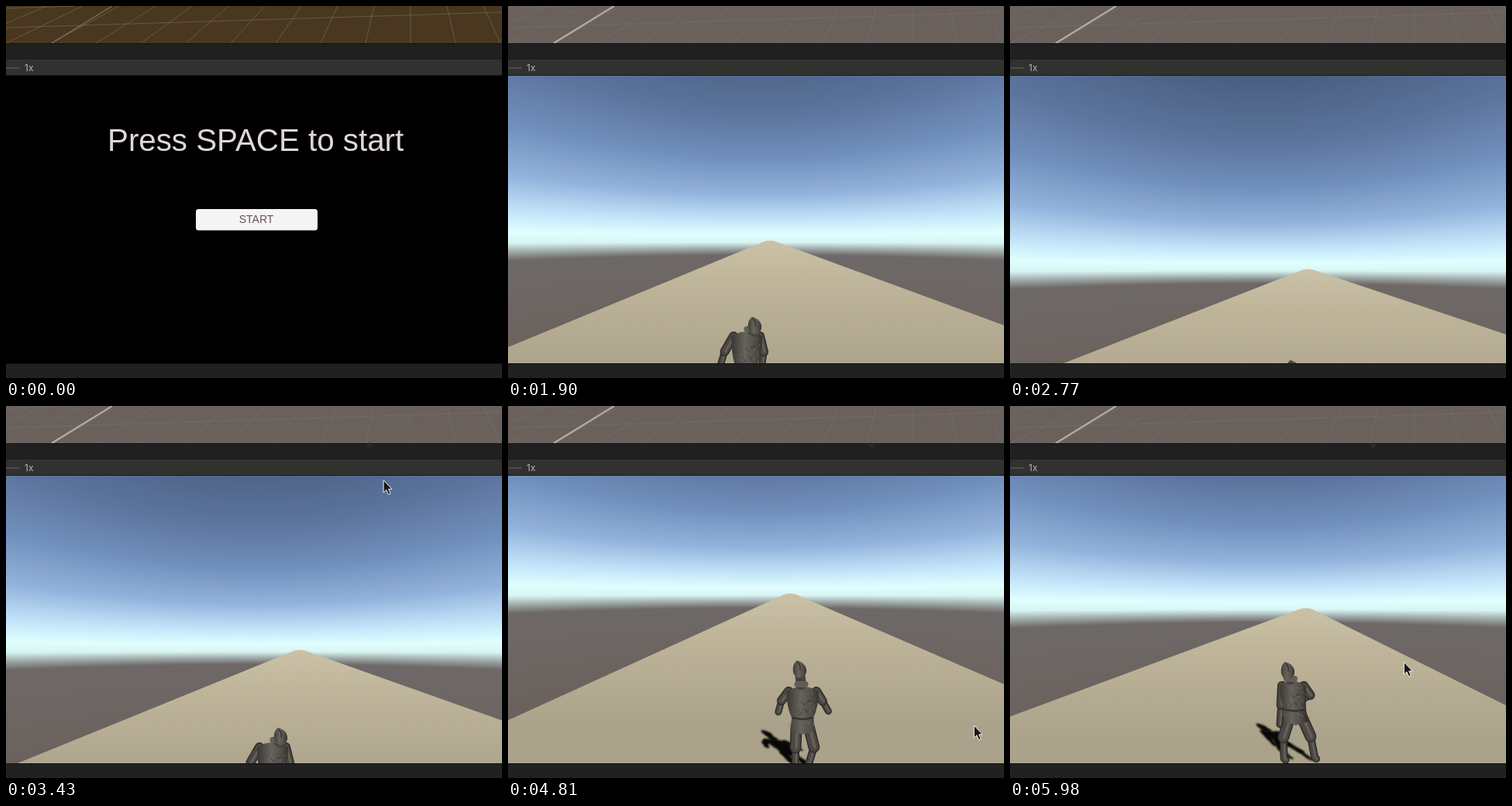
Write an HTML page with a canvas that moves like this. It is 640 by 480 pixels and loops after 6.01 s.

```html
<!DOCTYPE html>
<html lang="en">
<head>
<meta charset="utf-8">
<title>Runner</title>
<style>
html, body { margin: 0; width: 100%; height: 100%; overflow: hidden; background: #000; }
#stage { position: relative; width: 640px; height: 480px; overflow: hidden; }
canvas, svg { position: absolute; left: 0; top: 0; display: block; }
.ground { fill: #6a615c; }
.grid { fill: none; stroke: #7b7977; stroke-width: .8; opacity: .5; }
.axis { stroke: #b3aca0; stroke-width: 2.2; }
.menu .ground { fill: #4a371f; }
.menu .grid { stroke: #7b7060; opacity: .75; }
.menu .axis { stroke: #8d8578; stroke-width: 1; }
#title, .pointer { visibility: hidden; }
.menu #title, .steering .pointer { visibility: visible; }
.arial { font-family: "Liberation Sans", Arial, sans-serif; }
</style>
</head>
<body>
<div id="stage" class="menu">
<canvas id="game" width="640" height="480"></canvas>
<svg width="640" height="480">
  <rect class="ground" width="640" height="48"/>
  <path id="grid" class="grid"/>
  <path class="axis" d="M59 48L137 0"/>
  <rect y="48" width="640" height="21" fill="#202020"/>
  <rect y="48" width="640" height="1" fill="#111"/>
  <rect y="69" width="640" height="20" fill="#31312f"/>
  <path d="M0 68.5H640M0 89.5H640" stroke="#1a1a19"/>
  <path d="M0 80H18" stroke="#686866"/>
  <text x="24" y="84" font-size="12" fill="#b4b4b2" font-family="Inter, sans-serif">1x</text>
  <rect y="461" width="640" height="19" fill="#212121"/>
  <rect y="461" width="640" height="1" fill="#111"/>
  <path d="M0 479.5H640" stroke="#2b1c28"/>
  <path class="pointer" d="M464 51L469 47L474 51L469 55Z" fill="#2a2928"/>
  <g id="title" class="arial">
    <rect y="90" width="640" height="371" fill="#000"/>
    <text x="131" y="187" font-size="40.3" fill="#e1d6d6">Press SPACE to start</text>
    <rect x="245" y="262" width="157" height="27.5" rx="3.5" fill="#f5f5f5"/>
    <text x="323" y="280" font-size="14" fill="#62534f" text-anchor="middle">START</text>
  </g>
  <path id="cursor" class="pointer" d="M0 0V16L3.6 12.5L6.2 18.5L9 17.3L6.4 11.6H11Z" fill="#161616" stroke="#f4f4f4"/>
</svg>
</div>
<script>
const LOOP = 6010, START = 1290, STEP = 46.4, FOCAL = 321;
const stage = document.getElementById("stage");
const cursor = document.getElementById("cursor");
const ctx = document.getElementById("game").getContext("2d");

const mix = (a, b, k) => a + (b - a) * k;
const smooth = v => {
  const k = Math.max(0, Math.min(1, v));
  return k * k * (3 - 2 * k);
};

// Camera and runner; everything else follows from these
const keys = [
  { t: 1290, horizon: 279, apex: 328, drift: 0, x: 312, y: 374 },
  { t: 1900, horizon: 303, apex: 338, drift: .15, x: 318, y: 401 },
  { t: 2770, horizon: 340, apex: 385, drift: .21, x: 365, y: 457 },
  { t: 3430, horizon: 315, apex: 379, drift: .18, x: 354, y: 415 },
  { t: 4810, horizon: 242, apex: 364, drift: .06, x: 376, y: 328 },
  { t: 5980, horizon: 261, apex: 382, drift: -.34, x: 358, y: 330 }
];

function sceneAt(t) {
  const next = Math.max(1, keys.findIndex(key => key.t > t));
  const a = keys[next - 1], b = keys[next], k = smooth((t - a.t) / (b.t - a.t));
  return Object.fromEntries(Object.keys(a).map(name => [name, mix(a[name], b[name], k)]));
}

function fillGradient(g, stops) {
  for (const [at, color] of stops) g.addColorStop(at, color);
  return g;
}

// One column of sky and ground, horizon in the middle
const sky = document.createElement("canvas");
sky.width = 1;
sky.height = 800;
{
  const c = sky.getContext("2d");
  c.fillStyle = fillGradient(c.createLinearGradient(0, 0, 0, 800), [
    [-250, "#4a5e80"], [-160, "#5d769f"], [-105, "#7190bd"], [-60, "#93b3dc"], [-28, "#c2e3f9"],
    [-8, "#e0ffff"], [2, "#d6f5f3"], [10, "#a0aba9"], [18, "#6e6968"], [160, "#6a5e57"]
  ].map(([d, color]) => [(d + 400) / 800, color]));
  c.fillRect(0, 0, 1, 800);
}

function drawSky(h) {
  for (let x = 0; x < 640; x += 2) {
    const s = Math.hypot(1, (x - 325) / FOCAL);
    ctx.drawImage(sky, x, h - 400 * s, 2, 800 * s);
  }
}

// Looking further up lowers the camera and widens the road
function drawRoad({ horizon: h, apex, drift }) {
  const half = (4.5 + .0105 * (h - 242)) / 2, depth = 300, tip = 7;
  ctx.fillStyle = fillGradient(ctx.createLinearGradient(0, h, 0, h + 170),
    [[0, "#cbc1a7"], [.3, "#bfb59a"], [1, "#aba28b"]]);
  ctx.beginPath();
  ctx.moveTo(apex - tip - depth * (half - drift), h + depth);
  ctx.lineTo(apex - tip, h + .7);
  ctx.quadraticCurveTo(apex, h - 1, apex + tip, h + .7);
  ctx.lineTo(apex + tip + depth * (half + drift), h + depth);
  ctx.fill();
}

// Obstacle that rushes towards the camera and passes it
function drawBlock(t, h) {
  if (t > 1480) return;
  const k = 1 / (1 - (t - START) / 320);
  const x = 328 - 238 * k, y = h - 10.5 * k, w = 447.5 * k;
  ctx.fillStyle = fillGradient(ctx.createLinearGradient(x + w, y, x + w * .65, 461),
    [[0, "#857e6c"], [1, "#7b7264"]]);
  ctx.fillRect(x, y, w, 480);
}

// Angle in degrees from straight down, positive to the right
function reach([x, y], angle, length) {
  const a = angle * Math.PI / 180;
  return [x + Math.sin(a) * length, y + Math.cos(a) * length];
}

function jointed(from, upper, lower, length) {
  const middle = reach(from, upper, length);
  return [from, middle, reach(middle, lower, length)];
}

// Joints measured from the top of the head
function skeletonAt(t) {
  const swing = (1 - Math.cos((t - 4810) / 780 * 2 * Math.PI)) / 2;
  const hunch = 1 - smooth((t - 3430) / 670);
  const pose = (a, b, hunched) => mix(mix(a, b, swing), hunched, hunch);

  const chest = [pose(4, 7, -10), pose(40, 31, 25)];
  const hips = [pose(4, 11, -11), pose(86, 72, 76)];
  const half = pose(18, 14, 17);
  const side = ([x, y], dx) => [x + dx, y];
  return {
    chest, hips, half,
    legs: [
      jointed(side(hips, -8), pose(-2, -18, -4), pose(0, 2, 4), 27),
      jointed(side(hips, 8), pose(14, 24, 4), pose(-18, 11, 0), 27)
    ],
    arms: [
      jointed(side(chest, -half), pose(-38, -3, -30), pose(-16, -4, -17), pose(15, 25, 23)),
      jointed(side(chest, half), pose(32, 35, 14), pose(32, -62, -8), pose(15, 15, 21))
    ]
  };
}

function line(points, width, color) {
  ctx.beginPath();
  points.forEach(([x, y]) => ctx.lineTo(x, y));
  ctx.lineWidth = width;
  ctx.strokeStyle = color;
  ctx.stroke();
}

function limb(points, width, flat) {
  line(points, width, flat || "#2f2d2a");
  if (flat) return;
  line(points, width - 3, "#4b4742");
  line(points.map(([x, y]) => [x + 1, y]), width / 4, "#635e57");
}

function metal(x, w) {
  return fillGradient(ctx.createLinearGradient(x - w, 0, x + w, 0),
    [[0, "#35322f"], [.45, "#67625b"], [.75, "#514d47"], [1, "#2f2d2a"]]);
}

// Scattered plates and creases, the same every time
function armour([x, y], w, height) {
  let seed = 7;
  const random = () => (seed = seed * 16807 % 2147483647) / 2147483647;
  for (let i = 0; i < 26; i++) {
    const px = x + (random() * 2 - 1) * w * .8, py = y + random() * height;
    line([[px, py], [px + random() * 6 - 3, py + random() * 4]], 1, i % 2 ? "#37342f" : "#736d65");
  }
}

function drawBody({ chest, hips, half, legs, arms }, flat) {
  const [cx, cy] = chest, [hx, hy] = hips, w = half + 3;
  const waist = [mix(cx, hx, .75), mix(cy, hy, .75)];
  ctx.lineCap = ctx.lineJoin = "round";

  for (const leg of legs) {
    const [hip, knee, foot] = leg;
    limb([knee, foot, [foot[0] + 2, foot[1] + 2]], 10, flat);
    limb([hip, knee], 15, flat);
  }
  for (const [shoulder, elbow, hand] of arms) {
    limb([elbow, hand], 9, flat);
    limb([shoulder, elbow], 12, flat);
  }

  ctx.beginPath();
  ctx.moveTo(cx - w, cy);
  ctx.quadraticCurveTo(cx, cy - 12, cx + w, cy);
  ctx.quadraticCurveTo(cx + w, waist[1] - 15, waist[0] + 14, waist[1]);
  ctx.lineTo(hx + 16, hy + 5);
  ctx.lineTo(hx, hy + 10);
  ctx.lineTo(hx - 16, hy + 5);
  ctx.lineTo(waist[0] - 14, waist[1]);
  ctx.quadraticCurveTo(cx - w, waist[1] - 15, cx - w, cy);
  ctx.fillStyle = flat || metal(cx, w + 2);
  ctx.fill();

  if (!flat) {
    armour(chest, w, hy - cy);
    line([[waist[0] - 13, waist[1]], [waist[0], waist[1] + 2], [waist[0] + 13, waist[1]]], 2.5, "#35322e");
  }

  line([[1, 19], [mix(1, cx, .4), cy - 8]], 13, flat || "#45413d");
  line([[mix(1, cx, .5) - 5, cy - 9], [mix(1, cx, .5) + 5, cy - 9]], 8, flat || "#625d56");
  ctx.beginPath();
  ctx.moveTo(-3, 0);
  ctx.bezierCurveTo(5, 2, 10, 8, 9, 15);
  ctx.bezierCurveTo(7, 25, -6, 25, -8, 15);
  ctx.bezierCurveTo(-9, 8, -7, 3, -3, 0);
  ctx.fillStyle = flat || metal(0, 10);
  ctx.fill();
  if (!flat) line([[-2, 2], [1, 7], [1, 12]], 1.5, "#37342f");
}

function drawRunner(t, x, y) {
  const body = skeletonAt(t);
  const feet = body.legs.map(leg => leg[2]);
  const fx = (feet[0][0] + feet[1][0]) / 2, fy = (feet[0][1] + feet[1][1]) / 2;
  ctx.save();
  ctx.translate(x + fx, y + fy);
  ctx.filter = "blur(0.8px)";
  ctx.transform(.68, .06, .34, .35, 0, 0);
  ctx.translate(-fx, -fy);
  drawBody(body, "#080807");
  ctx.restore();

  ctx.save();
  ctx.translate(x, y);
  drawBody(body);
  ctx.restore();
}

// The pointer steers the camera, so its place follows from the view
function placeCursor({ horizon, apex }) {
  const y = (337 - horizon) / .23;
  const x = 487 + .148 * (y - 95) - 4.5 * (apex - 379);
  cursor.setAttribute("transform", `translate(${x} ${y})`);
}

function render(time) {
  const now = time % LOOP, menu = now < START;
  const t = START + Math.floor((now - START) / STEP + .01) * STEP;
  stage.classList.toggle("menu", menu);
  stage.classList.toggle("steering", t >= 3140);
  if (menu) return;

  const scene = sceneAt(t);
  placeCursor(scene);
  ctx.save();
  ctx.beginPath();
  ctx.rect(0, 90, 640, 371);
  ctx.clip();
  drawSky(scene.horizon);
  drawRoad(scene);
  drawRunner(t, scene.x, scene.y);
  drawBlock(t, scene.horizon);
  ctx.restore();
}

// Floor grid of the upper panel: lines fan out from a far point
{
  let d = "M0 28L640 8M0 3L90 0";
  for (let i = -10; i <= 2; i++) d += `M${522 + i * 47} 0L${522 + i * 58} 48`;
  document.getElementById("grid").setAttribute("d", d);
}

const begin = performance.now();
function tick() {
  render(performance.now() - begin);
  requestAnimationFrame(tick);
}
tick();
</script>
</body>
</html>
```
